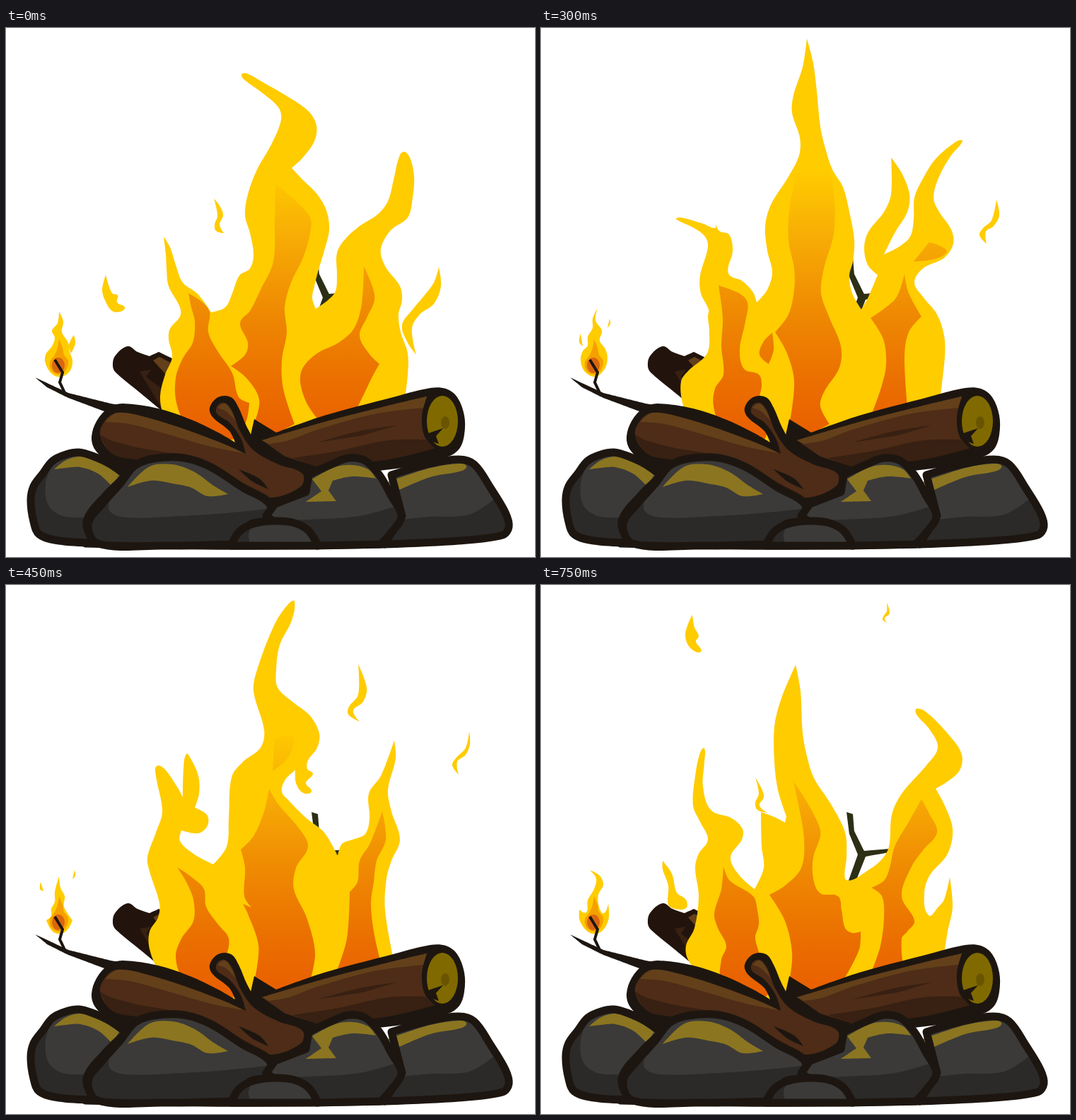
Recreate the animation shown at these times as an HTML page. Size 748 by 748 pixels, loop 900 ms.

```html
<!DOCTYPE html>
<html lang="en">
<head>
<meta charset="utf-8">
<title>Campfire</title>
<style>
html, body { margin: 0; height: 100%; overflow: hidden; background: #fff; }
svg { display: block; width: 100vw; height: 100vh; }
.pose { visibility: hidden; animation: show 900ms step-end infinite; animation-delay: calc(var(--i) * 150ms - 900ms); }
@keyframes show { 0% { visibility: visible; } 16.6666%, 100% { visibility: hidden; } }
</style>
</head>
<body>
<svg viewBox="0 0 748 748">
  <defs>
    <linearGradient id="heat" gradientUnits="userSpaceOnUse" x1="0" y1="200" x2="0" y2="570">
      <stop offset="0" stop-color="#fc0"/>
      <stop offset=".27" stop-color="#f7ab05"/>
      <stop offset=".54" stop-color="#ef8a02"/>
      <stop offset=".8" stop-color="#eb7000"/>
      <stop offset="1" stop-color="#e96000"/>
    </linearGradient>
  </defs>
  <g id="back"></g>
  <g id="fire"></g>
  <g id="front"></g>
</svg>
<script>
const YELLOW = '#fc0', HEAT = 'url(#heat)', INK = '#1d1610', BARK = '#4e2c17',
      LIT = '#63401a', SHADE = '#382012', STONE = '#3b3a39', DIM = '#2b2a29', MOSS = '#8b7520';

// Closed curve through "x,y" points; a trailing * makes a sharp corner.
function curve(text) {
  const pts = text.trim().split(/\s+/).map(s => {
    const [x, y] = s.replace('*', '').split(',').map(Number);
    return { x, y, sharp: s.endsWith('*') };
  });
  const n = pts.length;
  pts.forEach((p, i) => {
    const a = pts[(i + n - 1) % n], b = pts[(i + 1) % n];
    const len = Math.hypot(b.x - a.x, b.y - a.y) || 1;
    p.dx = p.sharp ? 0 : (b.x - a.x) / len / 3;
    p.dy = p.sharp ? 0 : (b.y - a.y) / len / 3;
  });
  let d = `M${pts[0].x} ${pts[0].y}`;
  pts.forEach((p, i) => {
    const q = pts[(i + 1) % n], l = Math.hypot(q.x - p.x, q.y - p.y);
    d += `C${p.x + p.dx * l} ${p.y + p.dy * l} ${q.x - q.dx * l} ${q.y - q.dy * l} ${q.x} ${q.y}`;
  });
  return d + 'Z';
}

function add(parent, tag, attrs) {
  const el = document.createElementNS('http://www.w3.org/2000/svg', tag);
  for (const k in attrs) el.setAttribute(k, attrs[k]);
  return parent.appendChild(el);
}
const shape = (parent, fill, text, more) => add(parent, 'path', { d: curve(text), fill, ...more });
const outline = { stroke: INK, 'stroke-width': 11, 'stroke-linejoin': 'round' };

const back = document.getElementById('back');
shape(back, '#2d2f15', '432,321* 441,324* 443,348* 457,376* 492,373* 492,378* 459,384* 440,432* 430,432* 448,381* 436,352*');
shape(back, '#22140c', '151,478 154,464 172,450 186,458 203,464* 216,458* 245,472* 300,540* 225,545* 185,512 155,487');
shape(back, LIT, '208,470* 217,465* 250,482* 250,505* 226,490*');
shape(back, SHADE, '189,486* 205,483* 198,493* 240,525* 240,540* 218,534*');

// Each pose: flames in yellow, their hot cores, and the little flame on the twig.
const poses = [
  {
    flames: [
      '290,402* 310,395 320,375 330,350 345,340 350,320 345,290 338,265 342,235 355,200 375,165 389,130 385,112 360,90 338,74 333,66 340,64 362,76 400,98 428,118 439,138 436,160 420,183 404,198* 420,215 440,235 453,258 457,285 450,315 441,345 436,365 433,382 438,397* 455,385 466,372 468,350 468,318 480,298 500,280 525,264 540,245 548,215 555,185 562,175 571,183 577,210 575,240 568,268 545,285 532,305 530,320 538,340 557,365 560,385 555,405 558,430 568,460 568,490 562,540* 345,600* 280,580*',
      '290,402* 345,600* 240,575* 222,545 218,520 225,490 235,465 230,440 232,425 246,408 246,395 230,365 227,340 226,320 223,295* 232,310 240,335 250,360 270,375 282,390',
      '294,241* 303,253 307,265 302,278 308,290* 297,287 295,278 299,265',
      '141,349* 150,375 158,378 157,388 168,395 162,401 150,400 140,385 136,370',
      '612,338* 615,365 605,390 585,405 574,425 580,462* 568,445 560,420 575,398 590,380 605,360'],
    cores: [
      '258,375* 278,388 288,402 286,430 300,458 320,488 329,522 344,530* 340,555 325,580 290,580 255,560 241,530 240,495 250,467 264,445 267,415 262,395',
      '381,220* 410,245 430,268 430,290 420,325 403,360 394,395 397,430 390,470 392,510 408,560* 370,580* 352,556* 358,525 340,495 318,478* 338,462 342,445 331,417 345,400 360,370 378,330 380,270',
      '506,337* 518,365 521,385 510,410 500,435 513,460 528,475* 517,495 505,520 490,550* 440,552* 425,530 416,500 420,480 440,460 470,445 492,425 503,390'],
    ember: ['75,401* 81,415 79,430 88,445 90,458 94,470 91,484 79,493 66,490 56,475 56,462 65,450 69,438 65,428 73,417', '96,434* 98,446 92,460* 89,448']
  },
  {
    flames: [
      '263,395* 300,365 320,345 322,325 312,295 298,265 300,240 320,205 353,163 362,120 366,58 372,52 382,60 397,85 409,115 413,150 409,170 390,190 379,215 379,238 392,258 420,275 438,292 442,320 439,350 444,380 456,402* 468,388 460,374 450,356 455,337 475,318 486,290 488,240* 497,260 505,285 506,296* 525,275 540,250 541,228 538,215 555,185 574,148* 572,190 564,230 562,260 566,300 568,340 560,375 550,405 553,435 566,460 570,485 564,540* 345,600* 270,580*',
      '263,395* 345,600* 240,575* 222,548 218,520 225,490 234,462 230,448 221,434* 246,431* 240,415 225,385 214,350 212,325 216,295* 230,335 245,365',
      '282,218* 287,228 285,238* 281,230',
      '113,275* 118,290 124,292 124,300 130,304 122,307 112,298 110,288',
      '629,296* 637,325 630,350 605,370 590,390 587,405 595,432* 580,420 572,400 580,380 600,362 618,335'],
    cores: [
      '244,396* 265,412 278,435 280,455 290,470 315,490 328,520 338,515* 339,545 325,580 290,580 255,560 240,525 242,500 262,475 267,450 260,425',
      '357,278* 375,300 392,330 395,355 385,385 385,410 405,440 420,470 417,500 398,520 393,542 418,555* 370,580* 352,556* 356,520 352,485 338,474 327,478 325,491* 310,472 308,460 340,430 368,405 373,360 365,320',
      '549,286* 549,310 548,350 540,390 520,430 515,455 522,475 508,515 500,542* 468,545* 482,505 488,470 487,430 489,405 495,355 515,320 540,300'],
    ember: ['75,395* 80,412 79,430 85,448 91,458 94,470 91,484 79,493 66,490 55,475 52,458* 61,463 67,445 66,430 73,412', '99,424* 99,438 93,452* 91,440']
  },
  {
    flames: [
      '305,388* 320,370 327,345 320,315 317,280 325,250 350,210 365,180 366,155 355,120 357,95 370,55 376,15* 385,50 390,90 395,140 402,170 412,200 427,225 436,260 443,300 441,330 436,350 440,375 453,398* 463,380 476,349* 462,335 457,310 463,288 485,260 495,235 495,183* 510,205 521,235 518,260 500,290 485,320* 505,310 522,295 527,270 528,240 540,213 558,185 588,160 596,160 580,180 563,210 555,240 563,260 580,285 583,305 570,325 540,340 528,360 540,380 560,405 570,435 571,465 562,540* 345,600* 290,580*',
      '305,388* 345,600* 240,575* 210,552 200,530 198,500 208,485 235,460 238,430 236,408 237,398 226,375 225,350 236,310 232,295 215,282 191,270 198,268 230,277 246,283 247,276* 252,287 266,292 271,315 265,347 285,358 300,374',
      '644,243* 648,265 640,280 629,288 630,305* 620,293 625,283 637,272'],
    cores: [
      '251,364* 280,375 292,388 289,415 281,455 287,482 308,490 312,505 308,530 318,578 290,582 255,562 244,535 246,510 258,490 255,450 257,410',
      '327,431* 329,455 322,475* 309,462 315,443',
      '365,195* 385,180 405,195 414,230 414,290 400,340 396,375 408,410 424,450 422,480 400,515 395,535 408,560* 370,580* 352,556* 358,500 348,460 331,430* 350,405 358,370 358,340 350,300 352,250',
      '514,348* 520,375 538,408* 520,430 514,465 518,535* 468,545* 482,505 488,475 484,440 466,410* 485,397 503,380',
      '549,303* 573,318 527,330*'],
    ember: ['80,396* 77,413 86,428 83,442 91,454 94,467 90,482 77,493 62,486 56,470 59,457 66,449 66,437 73,424 73,411', '56,432* 59,450* 54,444', '97,411* 98,418 94,424*']
  },
  {
    flames: [
      '293,395* 312,370 315,330 319,272 335,250 360,230 365,205 350,150 355,120 380,55 400,26 408,23 404,50 387,85 382,120 384,145 405,165 430,185 443,210 440,230 427,248 426,260 434,267 424,280 432,292 420,294 410,280 409,262* 395,275 390,292 400,305 425,330 450,350 469,383* 475,366 490,360 508,352 514,330 513,295 530,270 549,220* 551,245 540,290 545,320 557,360 545,390 538,415 536,460 550,540* 345,600* 280,580*',
      '293,395* 345,600* 240,575* 217,548 203,515 203,490 215,470 217,450 203,405 200,385 212,350 221,320 212,270 213,256 224,260 243,287 250,300* 251,260 255,239 261,245 272,270 273,295 267,315* 284,325 285,340 272,351 248,347* 246,362 265,380',
      '498,112* 510,145 505,165 491,178 500,193* 484,183 485,172 498,155',
      '655,207* 656,225 650,240 638,250 640,268* 631,255 636,245 650,230'],
    cores: [
      '242,399* 265,415 280,430 283,455 300,480 315,500 310,530 302,555 325,580 280,580 250,557 240,525 248,500 265,475 265,445 255,420',
      '372,288* 385,310 415,345 427,370 410,400 407,430 425,470 437,520 430,560* 370,580* 352,556* 357,510 342,465 335,451* 347,456* 337,440 338,400 332,374* 350,355 365,320',
      '380,218* 405,215 398,245 377,263*',
      '532,320* 537,360 524,390 520,420 516,450 520,490 530,535* 468,545* 482,500 486,434* 497,420 500,390 515,365'],
    ember: ['75,412* 77,428 83,440 82,455 94,474* 88,486 79,493 66,490 57,474* 64,468 64,458 69,448 69,434', '49,420* 53,433* 48,430', '97,403* 98,411 94,416*']
  },
  {
    flames: [
      '303,433* 315,410 310,385 316,360 312,317* 327,328* 335,315 355,305 365,290 362,265 350,215 358,170 371,114* 379,140 382,185 386,215 402,240 425,280 427,300 418,325 425,360 437,395 441,431* 448,415 457,390 460,372 468,365 478,378 487,372* 489,335 495,295 510,265 542,218* 540,255 530,300 530,335 543,370 544,410 536,440 532,465 545,488 558,475* 566,485 565,540* 345,600* 290,580*',
      '303,433* 345,600* 240,578* 200,528 191,505 195,480 185,450 173,416* 195,445 205,470 217,484 235,465 240,440 228,415 218,395 220,370 228,335 224,315 212,295 210,232* 230,275 255,325 280,355 298,385 302,410',
      '227,164* 229,195 240,208 238,220 247,242 238,250 225,245 212,220 212,195',
      '447,135* 442,152 447,160 442,167 446,175 438,175 433,160 437,145',
      '498,62* 510,95 505,115 492,125 500,143* 484,132 486,122 497,105',
      '655,178* 656,187 648,198* 646,192'],
    cores: [
      '240,350* 262,347 280,360 285,385 287,425 298,460 314,490 312,520 302,550 320,580 280,580 248,557 240,530 250,500 262,470 258,440 245,410 240,380',
      '384,248* 395,275 406,300 400,320 398,345 410,365 411,385 408,410 418,440 435,480 460,515 445,550* 370,580* 352,556* 357,510 338,475 312,450* 344,428* 340,424* 357,415 372,390 372,365 363,340 378,310',
      '506,338* 515,370 521,400 510,435 505,460 515,485 537,520* 480,545* 487,500 465,475 444,458* 470,445 490,420 503,390'],
    ember: ['73,412* 75,428 81,440 81,455 86,466 93,464* 92,482 80,492 66,490 57,474* 64,468 64,458 69,448 69,430', '48,400* 50,408* 46,405']
  },
  {
    flames: [
      '302,430* 315,400 312,370 311,321* 330,328 345,336* 347,327* 335,290 330,250 330,200 340,160 360,113* 367,150 370,210 378,250 387,275 410,310 430,350 432,385 430,415 440,417 460,405 480,390 492,370 496,325 510,295 545,255 561,230 550,205 531,183 531,175 545,180 575,210 595,240 590,265 558,288* 570,310 582,345 575,380 550,410 542,435 548,467 562,455 570,445 578,413* 582,455 575,490 567,540* 345,600* 290,580*',
      '302,430* 345,600* 240,575* 208,530 205,510 217,485 223,440 218,400 223,380 236,360 225,335 215,312 218,270 225,237 231,231 231,250 229,285 240,318 270,330 285,345 284,360 268,385 280,410',
      '303,272* 312,288 315,300 309,312 320,322* 306,318 303,308 308,295',
      '172,390* 185,408 192,435 205,445 205,457 190,458 180,452 180,425 172,402',
      '214,42* 217,60 223,72 219,80 227,93 220,95 208,85 204,70 208,55',
      '489,25* 493,40 486,47 489,53* 483,49 485,43 489,37'],
    cores: [
      '258,398* 267,418 300,440 306,460 308,480 303,500 315,540 320,580 280,582 255,562 255,530 262,510 250,485 245,465 255,430',
      '357,278* 375,305 393,340 395,355 385,385 385,415 395,436 420,440 425,460 430,485 440,492 452,490* 450,515 430,555* 370,580* 352,556* 355,520 345,475 323,438* 345,425 368,400 372,360 365,315',
      '538,303* 550,325 560,350 540,375 523,400 510,440 528,475 518,490 510,500 512,540* 468,545* 480,510 485,470 482,440 467,428* 485,418 493,400 500,370 520,335'],
    ember: ['69,403* 83,411 88,424 81,438 82,455 89,464 95,450* 96,470 90,485 79,493 66,490 55,475 54,459* 64,463 66,446 75,430 78,415']
  }
];

const fire = document.getElementById('fire');
poses.forEach(({ flames, cores, ember }, i) => {
  const g = add(fire, 'g', { class: 'pose', style: `--i:${i}` });
  flames.forEach(f => shape(g, YELLOW, f));
  cores.forEach(c => shape(g, HEAT, c));
  ember.forEach(e => shape(g, YELLOW, e));
  shape(g, '#f5a000', '75,440* 80,452 82,462 88,471 84,485 74,490 64,484 62,473 69,462 73,452');
  add(g, 'ellipse', { cx: 74, cy: 477, rx: 9, ry: 11, fill: '#d9660f' });
});

const front = document.getElementById('front');

// Twig
shape(front, INK, '41,494* 88,516* 148,531* 165,534* 150,546* 88,523* 58,508*');
add(front, 'path', { d: 'M85 520L76 501L80 487L69 469', fill: 'none', stroke: INK, 'stroke-width': 4 });

// Right log
shape(front, INK, '351,553* 382,572* 450,548 540,524 600,509 622,510 638,522 648,548 648,575 641,595 625,606 560,622 430,634* 370,612* 345,580*');
shape(front, BARK, '362,583* 450,557 540,534 595,521* 588,550 592,578 606,594* 540,610 440,620* 395,606*');
shape(front, LIT, '362,583* 450,557 540,534 595,521* 590,537* 520,546 440,568 400,583 372,588*');
shape(front, SHADE, '405,608* 470,598 540,583 593,582* 606,594* 540,610 440,620*');
shape(front, SHADE, '440,586* 500,570 552,562* 505,576*');
add(front, 'ellipse', { cx: 617, cy: 556, rx: 22, ry: 36, fill: '#806a00' });
add(front, 'ellipse', { cx: 621, cy: 558, rx: 6, ry: 9, fill: '#695500' });
shape(front, INK, '594,574* 618,566* 608,577* 612,588* 600,584*');

// Left log with its branch
shape(front, INK, '121,578 128,556 145,537 165,531 215,538 260,553 300,572 324,586* 316,570 292,550 288,537 300,522 318,522 329,537 341,565 355,586 385,605 432,623* 430,650* 400,664 372,674 330,662 290,642 250,628 210,618 172,626 140,610 125,595');
shape(front, BARK, '133,575 142,553 158,544 200,551 260,570 310,589 339,602* 332,580 316,558 298,545 299,534 309,530 319,540 331,570 350,597 385,617 419,630 417,648 375,664 340,652 290,632 240,616 190,610 150,601');
shape(front, LIT, '140,557* 158,544 200,551 260,570 310,589 336,601* 290,592 220,572 175,560');
shape(front, LIT, '299,537* 309,531 318,541 325,556* 311,542');
shape(front, SHADE, '133,575* 148,583 190,594 245,604 300,625 345,648 375,664* 340,654 290,634 240,618 190,611 150,602');
shape(front, INK, '329,624* 358,637 371,652* 348,641');

// Stones
function stone(body, shade, moss) {
  shape(front, STONE, body);
  shape(front, DIM, shade);
  if (moss) shape(front, MOSS, moss);
  shape(front, 'none', body, outline);
}
stone('35,668 39,648 52,630 66,612 85,603 103,600 122,605 148,617 170,633* 140,662 114,698 125,728* 75,725 47,716 39,698',
  '35,668 39,648 52,630 66,614* 56,645 60,675 80,690 112,692* 125,728* 75,725 47,716 39,698',
  '68,624* 85,611 105,606 130,613 160,632* 150,648* 130,630 105,621 85,622');
stone('545,632* 600,616 640,610 662,617 685,650 706,685 711,705 702,717 640,725 535,730* 560,690*',
  '560,695* 600,691 655,688 693,664* 706,685 711,705 702,717 640,725 535,730*',
  '540,642* 600,622 640,616 651,619 645,626 600,635 552,655*');
stone('116,702 135,674 160,646 182,619 208,609 252,608 290,621 335,650 372,672 372,694 345,702 322,730* 220,732 130,729',
  '116,702 150,658* 146,682 170,692 250,690 310,686 368,680* 372,694 345,702 322,730* 220,732 130,729',
  '172,649* 203,620 235,617 265,627 295,648 314,659* 285,662 262,650 235,644 205,640');
stone('368,690* 380,673* 424,656* 428,632* 460,617 485,608 508,612 528,632 545,662 559,690 546,712 530,730* 440,732* 420,705 385,700',
  '385,696* 430,695 500,690 552,676* 559,690 546,712 530,730* 440,732* 420,705',
  '433,638* 465,621 490,618 512,624 523,637* 490,634 462,640* 456,654* 467,669* 424,670* 446,655*');
stone('318,732* 330,712 350,701 380,697 408,700 428,711 441,732*',
  '318,732* 330,712 350,701* 343,716 346,732*');
add(front, 'path', { d: 'M112 730Q330 736 536 731', fill: 'none', stroke: INK, 'stroke-width': 9, 'stroke-linecap': 'round' });
</script>
</body>
</html>
```
